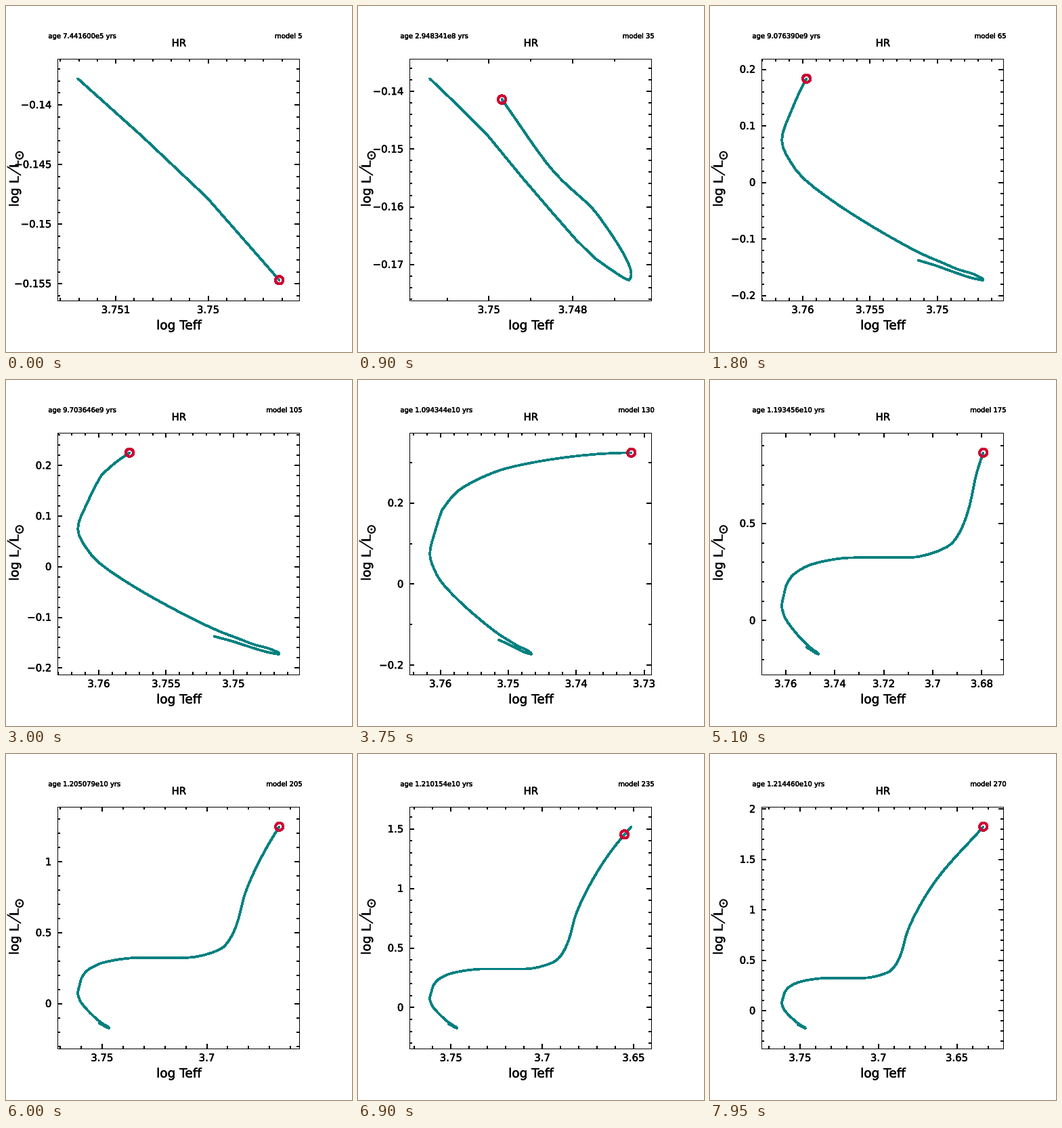
A matplotlib script that plays this animation: 511x511 px, repeating every 8000 ms.

```python
import math

import matplotlib.pyplot as plt
import numpy as np
from matplotlib.animation import FuncAnimation
from matplotlib.collections import LineCollection
from matplotlib.patches import Circle, Rectangle
from matplotlib.patheffects import withStroke

SIZE, DPI = 511, 64
PT = 72 / DPI                      # points per pixel
LEFT, TOP, SIDE = 76, 77, 357      # plot box in pixels
MODELS_PER_STEP, FRAMES_PER_STEP = 5, 3
FRAMES, INTERVAL = 160, 50
TEAL, CRIMSON = "#008080", "#cc0033"

# Key points of the evolution: model number, log Teff, log L.
KEYS = np.array([
    # settling onto the main sequence
    (2, 3.75141, -.1378), (4, 3.75001, -.1478), (5, 3.74923, -.1547),
    (8, 3.74747, -.1689), (12, 3.74666, -.1727), (14, 3.7466, -.1717),
    (23, 3.7474, -.1614), (29, 3.74844, -.154), (35, 3.74969, -.1414),
    # main sequence
    (40, 3.7511, -.127), (48, 3.75734, -.04), (52, 3.76055, .0234),
    (56, 3.76155, .0749), (60, 3.76085, .1263), (65, 3.75972, .1835),
    # subgiant, then red giant
    (105, 3.75771, .2254), (120, 3.75105, .2818), (130, 3.73188, .3242),
    (137, 3.7094, .3242), (142, 3.69227, .3965), (150, 3.6855, .5686),
    (168, 3.68172, .7757), (205, 3.66537, 1.248), (270, 3.63312, 1.8255),
])


def early_age(model):
    """Age while every time step is 20% longer than the one before."""
    return 1e5 * (1.2 ** model - 1) / 0.2


LATE_AGES = np.array([
    (50, early_age(50)), (65, 9.07639e9), (105, 9.703646e9),
    (150, 1.17395e10), (205, 1.205079e10), (270, 1.21446e10),
])


def smooth(x, knots, values):
    """Monotone cubic interpolation."""
    h = np.diff(knots)
    s = np.diff(values) / h
    product = s[:-1] * s[1:]
    total = np.where(product > 0, s[:-1] + s[1:], 1)
    inner = np.where(product > 0, 2 * product / total, 0)
    m = np.concatenate([s[:1], inner, s[-1:]])
    i = np.clip(np.searchsorted(knots, x, side="right") - 1, 0, len(h) - 1)
    u = (x - knots[i]) / h[i]
    rise = values[i + 1] - values[i]
    return (values[i] + rise * u * u * (3 - 2 * u)
            + h[i] * u * (1 - u) * (m[i] * (1 - u) - m[i + 1] * u))


# The star briefly runs back down the giant branch before climbing on.
PROGRESS = np.interp(np.arange(2, 271), (2, 205, 226, 233, 270),
                     (2, 205, 234, 224, 270))
LOG_T, LOG_L = (smooth(PROGRESS, KEYS[:, 0], KEYS[:, k]) for k in (1, 2))


def age_text(model):
    age = early_age(model) if model <= 50 else smooth(model, *LATE_AGES.T)
    mantissa, exponent = f"{age:.6e}".split("e")
    return f"age {mantissa}e{int(exponent)} yrs"


def limits(values):
    margin = 0.1 * np.ptp(values)
    return values.min() - margin, values.max() + margin


def ticks(lo, hi):
    """Yield (value, label); minor ticks have an empty label."""
    raw = 0.2 * (hi - lo)
    power = 10.0 ** math.floor(math.log10(raw))
    nice = next(n for n in (2, 5, 10) if raw / power <= n)
    parts = 2 if nice == 2 else 5
    step = nice * power
    minor = step / parts
    for k in range(math.ceil(lo / minor), math.floor(hi / minor) + 1):
        label = "" if k % parts else f"{k // parts * step:.6g}"
        yield k * minor, label.replace("-", "\u2212")


fig = plt.figure(figsize=(SIZE / DPI, SIZE / DPI), dpi=DPI, facecolor="white")
ax = fig.add_axes([0, 0, 1, 1])


def text(x, y, s, size, **options):
    options = {"va": "baseline", "ha": "center", **options}
    stroke = withStroke(linewidth=0.5 * PT, foreground="black")
    ax.text(x, y, s, fontsize=size * PT, family="DejaVu Sans", color="black",
            path_effects=[stroke], **options)


def draw_labels(model):
    text(62, 47, age_text(model), 10, ha="left")
    text(437, 47, f"model {model}", 10, ha="right")
    text(255, 59, "HR", 14.9)
    text(255, 477, "log Teff", 18.5)
    for y, part in ((296, "log"), (261, "L"), (238, "L")):
        text(18, y, part, 18.5, ha="left", rotation=90, rotation_mode="anchor")
    ax.plot([21, 2], [249, 237], color="black", lw=1.8 * PT)
    ax.add_patch(Circle((19.5, 220), 5.3, fill=False, ec="black", lw=2 * PT))
    ax.add_patch(Circle((19.5, 220), 1.5, fc="black", lw=0))


def draw_axes(x_range, y_range, to_x, to_y):
    right, bottom = LEFT + SIDE, TOP + SIDE
    marks = []
    for value, label in ticks(*x_range):
        x, size = to_x(value), 7 if label else 4
        marks += [[(x, TOP), (x, TOP + size)],
                  [(x, bottom), (x, bottom - size)]]
        text(x, 453, label, 14.9)
    for value, label in ticks(*y_range):
        y, size = to_y(value), 7 if label else 4
        marks += [[(LEFT, y), (LEFT + size, y)],
                  [(right, y), (right - size, y)]]
        text(67, y + 5, label, 14.9, ha="right")
    ax.add_collection(LineCollection(marks, colors="black", antialiaseds=False,
                                     linewidths=1.8 * PT))
    ax.add_patch(Rectangle((LEFT, TOP), SIDE, SIDE, fill=False, ec="black",
                           lw=PT, antialiased=False))


def draw(frame):
    model = MODELS_PER_STEP * (frame // FRAMES_PER_STEP + 1)
    log_t, log_l = LOG_T[:model - 1], LOG_L[:model - 1]
    x_range, y_range = limits(log_t), limits(log_l)

    def to_x(t):
        return LEFT + SIDE * (x_range[1] - t) / (x_range[1] - x_range[0])

    def to_y(l):
        return TOP + SIDE * (y_range[1] - l) / (y_range[1] - y_range[0])

    ax.clear()
    # Whole numbers fall just short of pixel centres, so lines snap to them.
    ax.set(xlim=(-0.4, SIZE - 0.4), ylim=(SIZE - 0.6, -0.6))
    ax.axis("off")
    draw_labels(model)
    draw_axes(x_range, y_range, to_x, to_y)
    x, y = to_x(log_t), to_y(log_l)
    ax.plot(x, y, color=TEAL, lw=2.7 * PT, antialiased=False,
            solid_joinstyle="round", solid_capstyle="round", zorder=3)
    ax.add_patch(Circle((x[-1], y[-1]), 5.6, fill=False, ec=CRIMSON,
                        lw=3 * PT, antialiased=False, zorder=4))
    return []


animation = FuncAnimation(fig, draw, frames=FRAMES, init_func=lambda: [],
                          interval=INTERVAL, repeat=True, repeat_delay=0)
plt.show()
```
